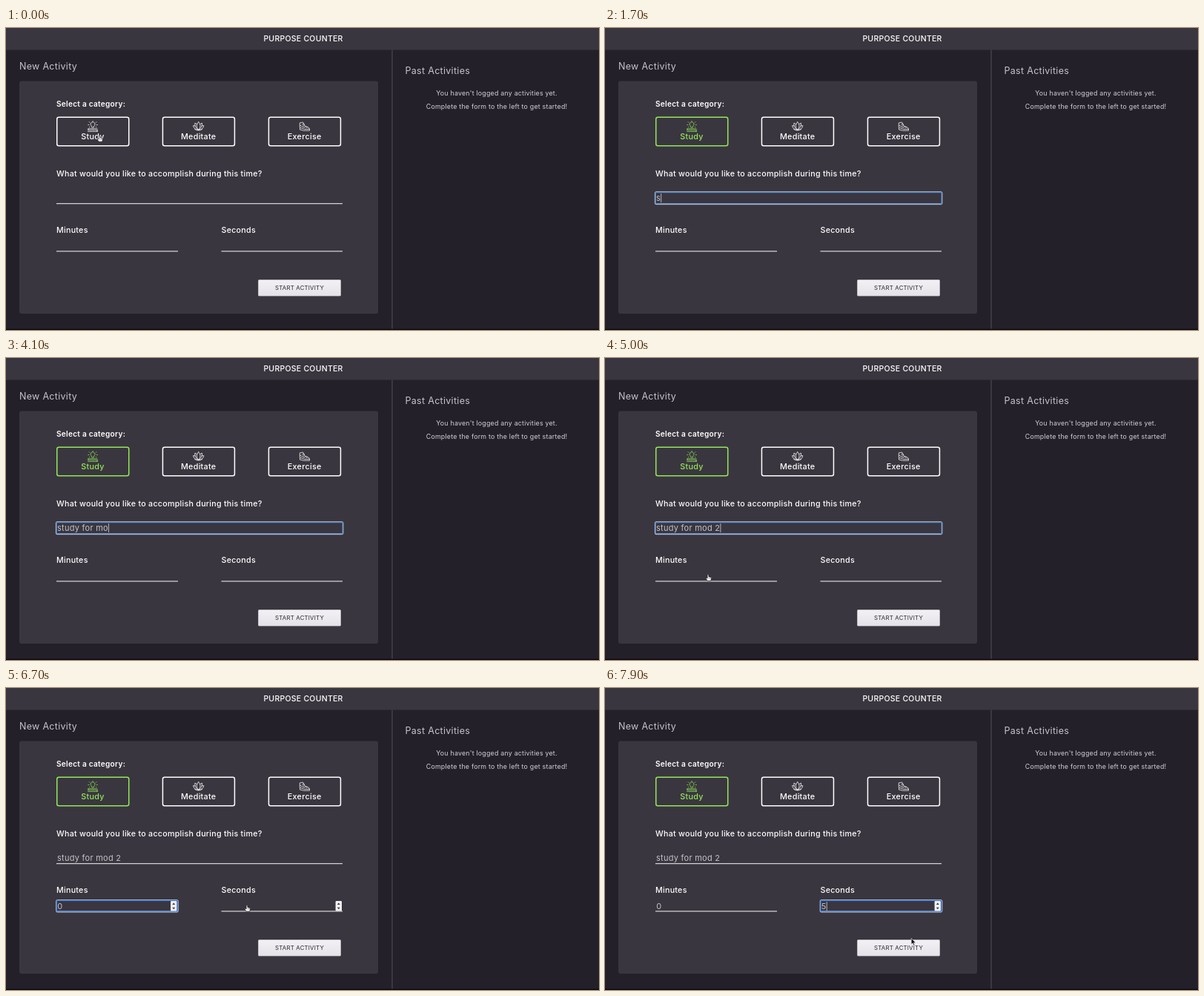
Recreate the animation shown at these times as an HTML page. Size 800 by 407 pixels, loop 8000 ms.

```html
<!DOCTYPE html>
<html lang="en">
<head>
<meta charset="utf-8">
<title>Purpose Counter</title>
<style>
  html, body { margin: 0; width: 100%; height: 100%; overflow: hidden; background: #242029; }
  svg { display: block; width: 800px; height: 407px; }
  text { font: 500 10.7px Inter, "Open Sans", sans-serif; letter-spacing: .024em; fill: #fff; white-space: pre; }
  .mid { text-anchor: middle; }
  .title { font-size: 10.5px; }
  .head { font-size: 12.5px; font-weight: 400; fill: #c6c3ca; }
  .note { font-size: 8.85px; font-weight: 400; fill: #d2cfd6; }
  .strong { font-size: 10.15px; font-weight: 600; }
  .typed { font-size: 11px; font-weight: 400; fill: #c3c0c7; }
  .button { font-size: 7.85px; font-weight: 400; fill: #2b2731; }
  .option { font-size: 7.1px; letter-spacing: 0; }
  .rule { stroke: #d3d1d6; stroke-width: 1.2; }
  .caret { stroke: #d8d6dc; stroke-width: .8; }
  .cat { color: #fff; }
  .cat.on { color: #92e858; }
  .cat text { font-size: 10.8px; fill: currentColor; }
  .cat rect { fill: none; stroke: currentColor; stroke-width: 1.5; }
  .cat path { fill: none; stroke: currentColor; stroke-width: .75; stroke-linejoin: round; stroke-linecap: round; }
</style>
</head>
<body>
<svg viewBox="0 0 800 407">
  <defs>
    <linearGradient id="face" x2="0" y2="1">
      <stop stop-color="#f3f1f5"/><stop offset="1" stop-color="#e5e2e8"/>
    </linearGradient>
    <g id="spinner">
      <rect width="8.4" height="13.4" rx="1" fill="#f0eff1"/>
      <path d="M2.2 5 4.2 2.4 6.2 5ZM2.2 8.6 4.2 11.2 6.2 8.6Z" fill="#39363d"/>
    </g>
    <g id="list">
      <rect x="-.5" y="1" width="165" height="28.5" rx="2" fill="#000" opacity=".22"/>
      <rect width="164" height="28" rx="2" fill="#232324"/>
      <text class="option" x="7" y="16">eeeeeeeee</text>
    </g>
  </defs>

  <rect width="800" height="407" fill="#242029"/>
  <rect width="800" height="29.5" fill="#3a363f"/>
  <rect x="520" y="29.5" width="2" height="377" fill="#3b3840"/>
  <rect x="18" y="71.5" width="484" height="313.5" rx="3" fill="#3a363f"/>
  <rect y="405.5" width="800" height="1.5" fill="#0e0d11"/>

  <text class="title mid" x="401" y="18.3">PURPOSE COUNTER</text>
  <text class="head" x="18" y="55.5">New Activity</text>
  <text class="head" x="538.5" y="62">Past Activities</text>
  <text class="note mid" x="662" y="91">You haven't logged any activities yet.</text>
  <text class="note mid" x="662" y="108.6">Complete the form to the left to get started!</text>

  <text class="strong" x="68" y="105.8">Select a category:</text>
  <g class="cat" id="study" transform="translate(68 119.5)">
    <rect x=".75" y=".75" width="97" height="38.5" rx="2.5"/>
    <text class="mid" x="49" y="30.3">Study</text>
    <path d="M47.8 14.2v-1.4a2.9 2.9 0 1 1 2.6 0v1.4zM49.1 6.5v-.6M45 8l-.8-.8M53.2 8l.8-.8M44 11h-1.2M54.2 11h1.2M45 13.7l-.7.6M53.2 13.7l.7.6M43 16.2h12M42.6 18h13M42.6 20h13M43 16.2v1.8M55 18v2"/>
  </g>
  <g class="cat" transform="translate(210.7 119.5)">
    <rect x=".75" y=".75" width="97" height="38.5" rx="2.5"/>
    <text class="mid" x="49" y="30.3">Meditate</text>
    <path d="M49 7q5 5.5 0 11q-5-5.500 0-11M46.800 10l-2.600-1.400q-.8 6 4.800 9.400M51.200 10l2.600-1.400q.8 6-4.800 9.400M44.400 12.300l-2.600-.2q1 5.600 7.200 5.900M53.600 12.300l2.600-.2q-1 5.600-7.200 5.900M44 17q5 3 10 0"/>
  </g>
  <g class="cat" transform="translate(353.7 119.5)">
    <rect x=".75" y=".75" width="97" height="38.5" rx="2.5"/>
    <text class="mid" x="49" y="30.3">Exercise</text>
    <path d="M43 8.300l3.800-.8 1 1.500 1.600 3.500 4.500 1.800q1.800.8 1.800 2.500H49l-6-2zM42.800 15.500v2l5 1.200h8v-1.800M46 10.300l2-1M47 12l2-1.200M43 11.500l3 2 3 .8M50 14.400l1-1.300M52 15l.8-1.200"/>
  </g>

  <text x="68" y="200">What would you like to accomplish during this time?</text>
  <text x="68" y="275.700">Minutes</text>
  <text x="290.500" y="275.700">Seconds</text>
  <path class="rule" d="M68 236.600H454M68 300.800H232M290.500 300.800H454"/>

  <rect x="340.500" y="339.500" width="111" height="21.500" rx="1" fill="url(#face)" stroke="#d0cdd4" stroke-width=".7"/>
  <text class="button mid" x="396" y="353.400">START ACTIVITY</text>

  <g id="fields"></g>

  <g id="hand">
    <path d="M-.9.700Q0-.500.900.700V3.200L4 4Q4.900 4.400 4.600 5.600L3.700 8.700H-.700L-3 5.600Q-2.900 4.300-1.800 4.900L-.9 5.600Z"
      fill="#fff" stroke="#17151a" stroke-width=".7" stroke-linejoin="round"/>
    <path d="M1 4.600V6M2.300 4.800V6M3.500 5V6" stroke="#17151a" stroke-width=".45"/>
  </g>
  <path id="arrow" d="M0 0V8.200L1.900 6.500 3.200 9.400 4.600 8.800 3.300 6H5.800Z"
    fill="#0a0a0b" stroke="#f4f4f4" stroke-width=".6" stroke-linejoin="round"/>
</svg>

<script>
const LOOP = 8000, STEP = 100;
const NS = "http://www.w3.org/2000/svg";
const $ = id => document.getElementById(id);

function add(parent, tag, attrs) {
  const node = document.createElementNS(NS, tag);
  for (const key in attrs) node.setAttribute(key, attrs[key]);
  return parent.appendChild(node);
}

const show = (node, on) => { node.style.display = on ? "" : "none"; };

// Last row whose time has been reached.
const at = (rows, t) => rows.filter(row => row[0] <= t).pop();

function makeField(x, y, width, height, ringColor, numeric) {
  const group = add($("fields"), "g", {});
  const ring = add(group, "g", { fill: "none" });
  const frame = (inset, color, stroke) => add(ring, "rect", {
    x: x + inset, y: y + inset, width: width - 2 * inset, height: height - 2 * inset,
    rx: 1.6, stroke: color, "stroke-width": stroke
  });
  frame(1.3, ringColor, 1.3);
  frame(.4, "#d3e3f8", .8);

  const spinner = numeric && add(group, "use", { href: "#spinner", x: x + width - 10.6, y: y + 1.9 });
  const base = y + 12.8;
  const text = add(group, "text", { class: "typed", x: x + 2, y: base });
  const caret = add(group, "line", { class: "caret", y1: base - 10, y2: base + 2 });
  const list = numeric && add(group, "use", { href: "#list", x: x + .7, y: y + 18.8 });

  return ({ value, focus, hover, caretOn, listAlpha = 0 }) => {
    text.textContent = value.replace(/ /g, "\u00a0");
    show(ring, focus);
    show(caret, caretOn);
    const end = x + 2.6 + (value ? text.getComputedTextLength() : 0);
    caret.setAttribute("x1", end);
    caret.setAttribute("x2", end);
    if (!numeric) return;
    show(spinner, focus || hover);
    list.style.opacity = listAlpha;
  };
}

const goal = makeField(67, 220.3, 388.3, 17.8, "#3c74bd", false);
const minutes = makeField(67.3, 285.2, 165.4, 17.3, "#2167cf", true);
const seconds = makeField(289.8, 285.2, 165.4, 17.3, "#2167cf", true);

const PHRASE = "study for mod 2";
const KEYS = [1700, 2000, 2200, 2400, 2600, 2800, 3100, 3200, 3300, 3400, 3800, 4000, 4200, 4400, 4800];

const PICK = 1100, MIN_FOCUS = 5300, MIN_KEY = 5900, SEC_FOCUS = 6800, SEC_KEY = 7100;

// time, x, y, pointer shape
const POINTER = [
  [0, 126, 144.5, "hand"],
  [1100, 168, 258.5, "hand"],
  [1700, 0, 0, ""],
  [4900, 143, 285, "hand"],
  [5000, 139, 291.5, "hand"],
  [5200, 137.3, 291.8, "hand"],
  [5900, 0, 0, ""],
  [6400, 178, 293, "hand"],
  [6500, 255, 293, "hand"],
  [6600, 312, 292.4, "hand"],
  [6700, 325, 292.4, "hand"],
  [7100, 0, 0, ""],
  [7700, 367, 303, "arrow"],
  [7800, 396, 324, "arrow"],
  [7900, 413.2, 337.3, "arrow"]
];

function fade(t, open, key) {
  if (t < open) return 0;
  return Math.max(0, Math.min(1, 1 - (t - key) / 300));
}

function draw(t) {
  $("study").classList.toggle("on", t >= PICK);

  const goalFocus = t >= PICK && t < MIN_FOCUS;
  goal({
    value: PHRASE.slice(0, KEYS.filter(key => key <= t).length),
    focus: goalFocus,
    caretOn: goalFocus
  });
  minutes({
    value: t >= MIN_KEY ? "0" : "",
    focus: t >= MIN_FOCUS && t < SEC_FOCUS,
    hover: t >= 5000 && t < MIN_FOCUS && false,
    caretOn: false,
    listAlpha: fade(t, MIN_FOCUS, MIN_KEY)
  });
  seconds({
    value: t >= SEC_KEY ? "5" : "",
    focus: t >= SEC_FOCUS,
    hover: t >= 6600,
    caretOn: t >= SEC_KEY,
    listAlpha: fade(t, SEC_FOCUS, SEC_KEY)
  });

  const [, x, y, shape] = at(POINTER, t);
  for (const id of ["hand", "arrow"]) {
    show($(id), id === shape);
    $(id).setAttribute("transform", `translate(${x} ${y})`);
  }
}

const start = performance.now();
function tick() {
  const t = (performance.now() - start) % LOOP;
  draw(Math.floor(t / STEP) * STEP);
  requestAnimationFrame(tick);
}
tick();
</script>
</body>
</html>
```
